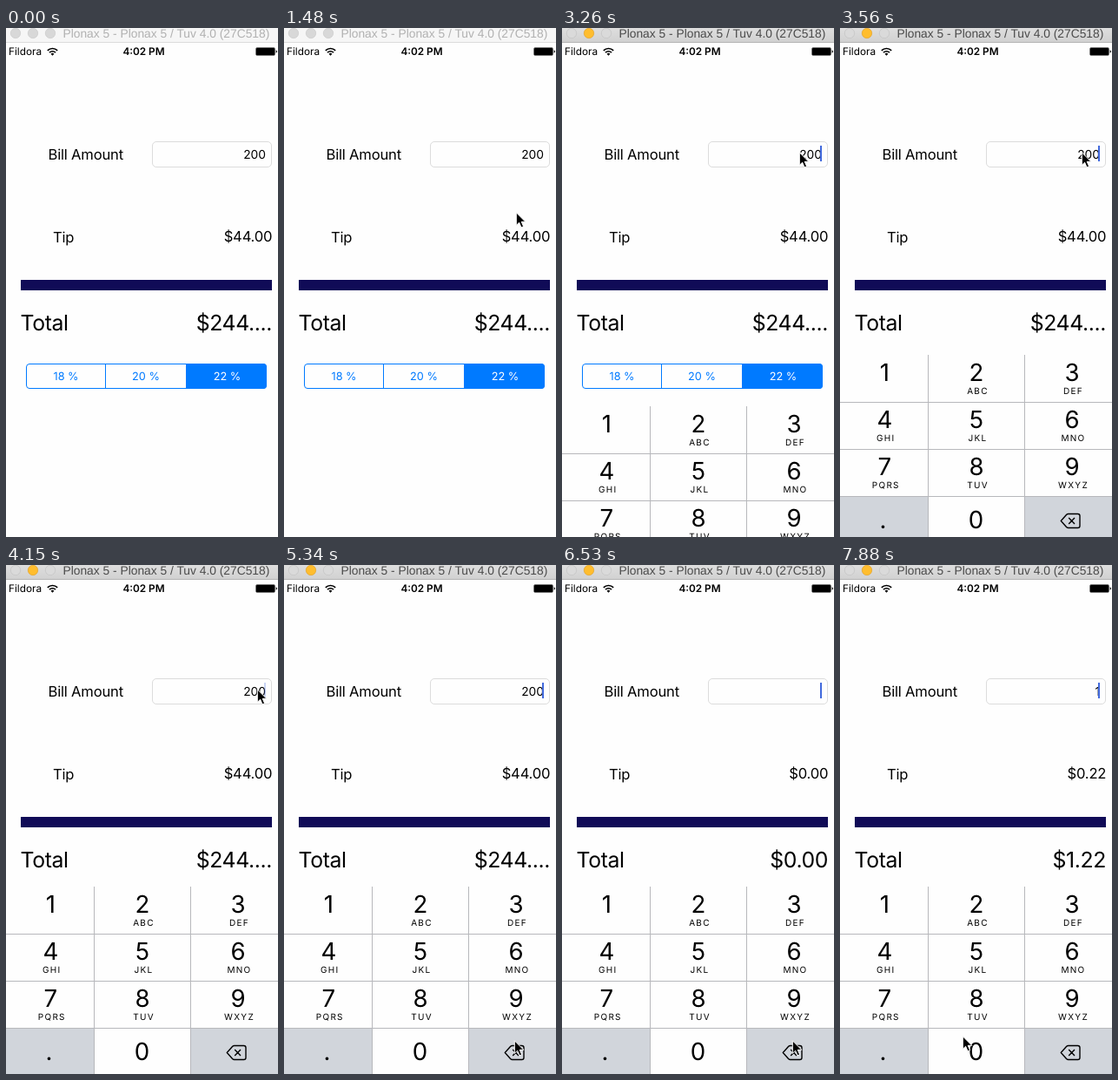
An HTML page for the animation above (8 s loop, 313x584 px).

```html
<!DOCTYPE html>
<html lang="en">
<head>
<meta charset="utf-8">
<title>Tip calculator</title>
<style>
  html, body { margin: 0; width: 100%; height: 100%; overflow: hidden; background: #fefefe; }
  svg { display: block; font-family: Inter, Roboto, sans-serif; text-rendering: geometricPrecision; }
  text { white-space: pre; }
  .end { text-anchor: end; }
  .mid { text-anchor: middle; }
  .status { font-size: 11.8px; }
  .label { font-size: 16.6px; letter-spacing: -.2px; }
  .big { font-size: 24.8px; letter-spacing: -.4px; }
  .field { font-size: 13.8px; }
  .segment { font-size: 12.7px; fill: #007aff; text-anchor: middle; }
  .digit { font-size: 27.6px; text-anchor: middle; }
  .letters { font-size: 10px; letter-spacing: 1.3px; text-anchor: middle; }
  .title { font: 13.8px "Liberation Sans", Arial, sans-serif; fill: #b1b1b1; }
  .bar { fill: #f6f6f6; }
  .edge { fill: #dcdcdc; }
  .light { fill: #d8d8d8; stroke: #cbcbcb; stroke-width: .7; }
  .active .title { fill: #4b4b4b; }
  .active .bar { fill: url(#chrome); }
  .active .edge { fill: #b4b4b4; }
  .active .light { fill: #dadada; stroke: #c3c3c3; }
  .active .light.min { fill: #ffbd2e; stroke: #e2a32a; }
</style>
</head>
<body>
<svg width="313" height="584" viewBox="0 0 313 584">
  <defs>
    <linearGradient id="chrome" x2="0" y2="1">
      <stop stop-color="#dedede"/><stop offset="1" stop-color="#d1d1d1"/>
    </linearGradient>
  </defs>
  <rect width="313" height="584" fill="#fefefe"/>

  <g id="window">
    <rect class="bar" width="313" height="16"/>
    <rect class="edge" y="16" width="313" height="1"/>
    <circle class="light" cx="11" cy="6" r="5.7"/>
    <circle class="light min" cx="31" cy="6" r="5.7"/>
    <circle class="light" cx="51" cy="6" r="5.7"/>
    <text class="title" x="65.5" y="11">Plonax 5 - Plonax 5 / Tuv 4.0 (27C518)</text>
  </g>

  <text class="status" x="3" y="31.3">Fildora</text>
  <g fill="none" stroke="#000" stroke-width="1.7">
    <path d="M47.8 25.9a8 8 0 0 1 11.4 0M50 28.2a4.9 4.9 0 0 1 7 0"/>
    <path d="M53.5 31.8l-1.9-2a2.7 2.7 0 0 1 3.8 0z" fill="#000" stroke="none"/>
  </g>
  <text class="status mid" x="158.5" y="31.3" font-weight="600">4:02 PM</text>
  <rect x="287.5" y="22.5" width="22" height="9" rx="1.5" fill="none" stroke="#777"/>
  <rect x="288" y="23" width="21" height="8" rx=".6"/>
  <path d="M310.6 25.3q1.4.4 1.4 1.7t-1.4 1.7z"/>

  <text class="label" x="48.5" y="150.6">Bill Amount</text>
  <rect x="168.5" y="130.5" width="137" height="29" rx="4.5" fill="#fefefe" stroke="#dcdcdc"/>
  <text id="bill" class="field end" x="299" y="149.8"></text>
  <rect id="caret" x="297" y="135" width="2" height="18" fill="#4169dc"/>

  <text class="label" x="54" y="245.6">Tip</text>
  <text id="tip" class="label end" x="306.3" y="244.8"></text>
  <rect x="17" y="289" width="289" height="12" fill="#100b57"/>
  <text class="big" x="16.5" y="346.6">Total</text>
  <text id="total" class="big end" x="306" y="346.6"></text>

  <rect x="23.5" y="385.5" width="276" height="28" rx="3.5" fill="none" stroke="#007aff"/>
  <path d="M114.5 385v29" stroke="#007aff"/>
  <path d="M207 385h89a4 4 0 0 1 4 4v21a4 4 0 0 1-4 4h-89z" fill="#007aff"/>
  <text class="segment" x="69" y="404">18 %</text>
  <text class="segment" x="161" y="404">20 %</text>
  <text class="segment" x="254.5" y="404" style="fill:#fff">22 %</text>

  <g id="pad">
    <rect y="369" width="313" height="216" fill="#fefefe"/>
    <rect y="531" width="102" height="54" fill="#d1d5db"/>
    <rect id="del" x="212" y="531" width="101" height="54" fill="#d1d5db"/>
    <path d="M101.5 369v216M212.5 369v216M0 423.5h313M0 477.5h313M0 531.5h313" stroke="#b7b8bc"/>
    <g id="keys"></g>
    <path d="M254.3 559.5l6.2-7q1-1 2.2-1h11q2.3 0 2.3 2.3v11.4q0 2.3-2.3 2.3h-11q-1.2 0-2.2-1zM263.2 556.1l6.8 6.8m0-6.8l-6.8 6.8"
      fill="none" stroke="#000" stroke-width="1.4" stroke-linejoin="round"/>
  </g>

  <path id="cursor" d="M1.3.8v14.6l3.3-3.2 2.4 5.6 2.6-1.1-2.4-5.4h4.6z" fill="#000" stroke="#fff"/>
</svg>
<script>
const LOOP = 8000, TICK = 148.5, LEAD = 14;
const $ = id => document.getElementById(id);

// Pointer path: tick, x, y
const path = [
  [5, 153, 575], [6, 190, 480], [8, 245, 320], [9, 260, 255], [10, 266, 211],
  [11, 262, 180], [12, 254, 162], [13, 263, 151], [15, 272, 142],
  [22, 272, 142], [28, 288, 142], [29, 280, 166], [31, 236, 290], [32, 208, 380],
  [33, 198, 450], [34, 214, 510], [35, 246, 538], [36, 264, 545],
  [44, 264, 545], [45, 250, 528], [47, 100, 418], [48, 67, 392],
  [49, 67, 392], [50, 72, 404], [52, 122, 512], [53, 140, 540]
];
const entries = [[0, "200"], [38, "20"], [39, "2"], [40, ""], [48, "1"]];
const blinkStarts = [3300, 5630, 6080, 7430];

function addText(cls, x, y, content) {
  const el = document.createElementNS("http://www.w3.org/2000/svg", "text");
  el.setAttribute("class", cls);
  el.setAttribute("x", x);
  el.setAttribute("y", y);
  el.textContent = content;
  $("keys").append(el);
}

const columns = [51.3, 157, 267];
["", "ABC", "DEF", "GHI", "JKL", "MNO", "PQRS", "TUV", "WXYZ"].forEach((letters, i) => {
  const x = columns[i % 3], y = 369 + 54 * Math.floor(i / 3);
  addText("digit", x, y + 29.5, i + 1);
  addText("letters", x + 1.5, y + 45, letters);
});
addText("digit", 49.5, 567.6, ".");
addText("digit", 156.5, 568, "0");

function pointerAt(k) {
  const i = path.findIndex(p => p[0] >= k);
  if (i < 0) return path[path.length - 1].slice(1);
  if (i === 0) return path[0].slice(1);
  const [k0, x0, y0] = path[i - 1], [k1, x1, y1] = path[i];
  const u = (k - k0) / (k1 - k0);
  return [x0 + (x1 - x0) * u, y0 + (y1 - y0) * u];
}

function caretAlpha(t) {
  const start = blinkStarts.filter(s => s <= t).pop();
  if (start === undefined) return 1;
  const p = (t - start) % 1000;
  if (p < 550) return 1;
  if (p < 700) return (700 - p) / 150;
  return p < 810 ? 0 : (p - 810) / 190;
}

const money = v => "$" + v.toFixed(2);
const clip = s => s.length > 6 ? s.slice(0, 4) + "...." : s;

function draw(t) {
  // The screen was sampled at a low rate, so every part moves on whole ticks.
  const k = Math.floor((t + LEAD) / TICK);
  const bill = entries.filter(e => e[0] <= k).pop()[1];
  const [x, y] = pointerAt(k);
  const drop = k < 21 ? 216 : Math.round(216 * Math.exp(-1.2 * (k - 21)));

  $("window").classList.toggle("active", k >= 18);
  $("bill").textContent = bill;
  $("tip").textContent = money(bill * .22);
  $("total").textContent = clip(money(bill * 1.22));
  $("caret").style.opacity = k < 21 ? 0 : caretAlpha(k * TICK + 6);
  $("pad").setAttribute("transform", `translate(0 ${drop})`);
  $("del").setAttribute("fill", k >= 38 && k < 41 ? "#fefefe" : "#d1d5db");
  $("cursor").style.display = k < 5 ? "none" : "";
  $("cursor").setAttribute("transform", `translate(${Math.round(x)} ${Math.round(y)})`);
}

let start;
function frame(now) {
  start ??= now;
  draw((now - start) % LOOP);
  requestAnimationFrame(frame);
}
draw(0);
requestAnimationFrame(frame);
</script>
</body>
</html>
```
